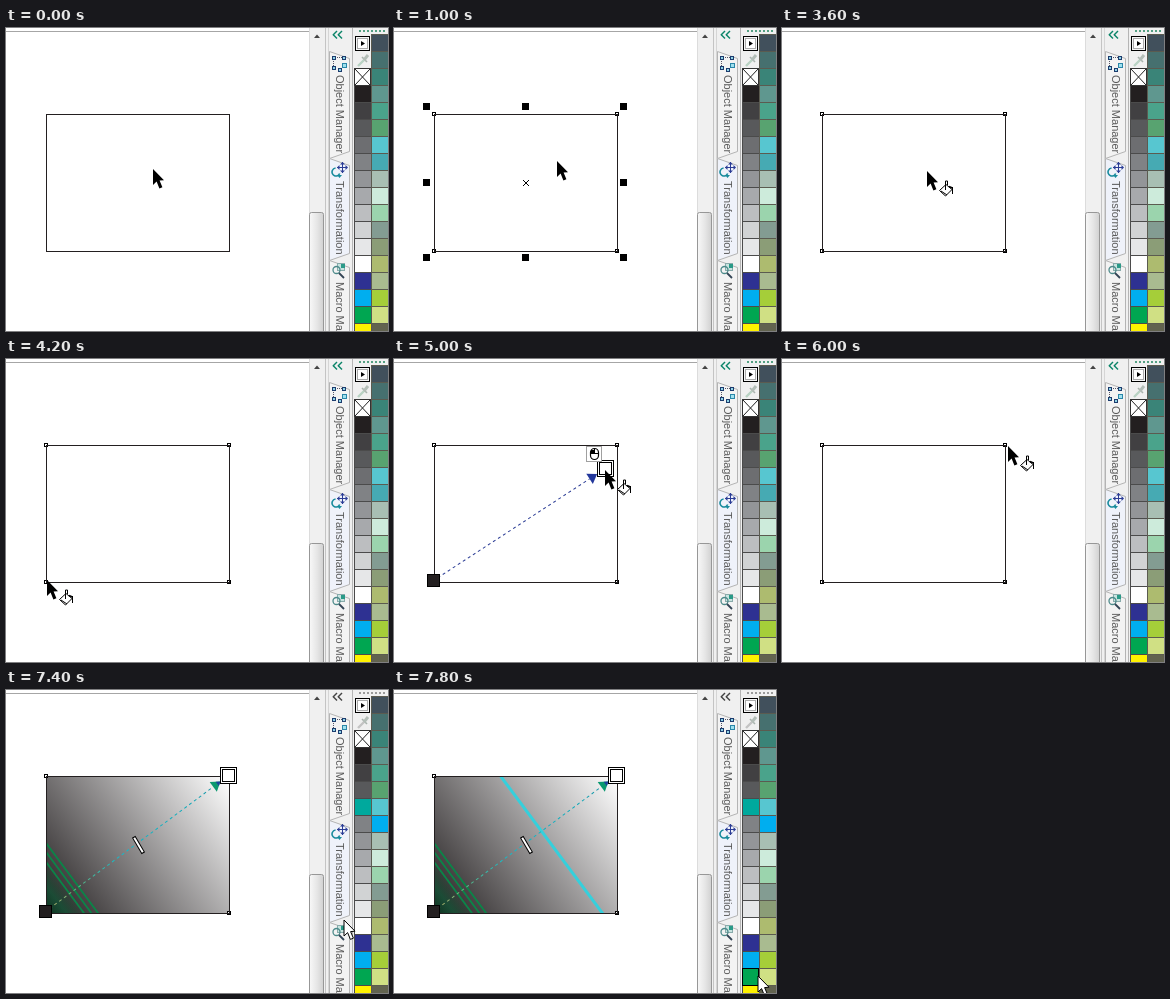
Write an HTML page with a canvas that moves like this. It is 382 px wide and 303 px high and loops after 8 s.

```html
<!DOCTYPE html>
<html lang="en">
<head>
<meta charset="utf-8">
<title>Interactive fill</title>
<style>
html, body { margin: 0; width: 100%; height: 100%; overflow: hidden; background: #fff; }
canvas { display: block; }
</style>
</head>
<body>
<canvas id="stage" width="382" height="303"></canvas>
<script>
const g = document.getElementById('stage').getContext('2d');
const INK = '#231f20';
const START = [39.5, 221.5], END = [222, 85];
const LEFT = ['#231f20', '#414042', '#58595b', '#6d6e71', '#808285', '#939598', '#a7a9ac',
  '#bcbec0', '#d1d3d4', '#e6e7e8', '#fff', '#2e3192', '#00aeef', '#00a651', '#fff200'];
const RIGHT = ['#41505c', '#46706f', '#3a8478', '#5f978f', '#4aa38b', '#58a370', '#57c6d0',
  '#46aab3', '#a8bfb3', '#cdebdb', '#9bd4ad', '#839c92', '#8b9d77', '#adbb6f', '#a9bb90',
  '#a5ce39', '#d0e084', '#62634f'];

// Pointer positions: start time, x, y
const PATH = [
  [0, 147, 141], [200, 163, 133], [3600, 145, 143], [3800, 51, 200], [4000, 47, 217],
  [4200, 41, 221], [4400, 53, 213], [4600, 113, 180], [4800, 178, 142], [5000, 211, 111],
  [5200, 219, 103], [5400, 225, 92], [5600, 226, 88], [5800, 226, 87], [6200, 227, 90],
  [7200, 278, 121], [7400, 338, 230], [7600, 364, 281], [7800, 364, 286]
];

function fill(color, x, y, w, h) {
  g.fillStyle = color;
  g.fillRect(x, y, w, h);
}

function box(x, y, w, h, border, inside) {
  fill(border, x, y, w, h);
  fill(inside, x + 1, y + 1, w - 2, h - 2);
}

function poly(points, color, stroke, width = 1) {
  g.beginPath();
  points.forEach(p => g.lineTo(p[0], p[1]));
  g.closePath();
  if (color) { g.fillStyle = color; g.fill(); }
  if (stroke) { g.strokeStyle = stroke; g.lineWidth = width; g.stroke(); }
}

function line(x1, y1, x2, y2, color, width = 1) {
  g.strokeStyle = color;
  g.lineWidth = width;
  g.beginPath();
  g.moveTo(x1, y1);
  g.lineTo(x2, y2);
  g.stroke();
}

function ring(x, y, r, color, width, from = 0, to = 7) {
  g.strokeStyle = color;
  g.lineWidth = width;
  g.beginPath();
  g.arc(x, y, r, from, to);
  g.stroke();
}

function at(x, y, draw, angle = 0) {
  g.save();
  g.translate(x, y);
  g.rotate(angle);
  draw();
  g.restore();
}

function blend(stops, a = START, b = END) {
  const grad = g.createLinearGradient(...a, ...b);
  stops.forEach(([k, c]) => grad.addColorStop(k, c));
  return grad;
}

function tab(top, bottom, label, textY, color = '#f3f3f3') {
  poly([[323.5, top], [343.5, top + 7], [343.5, bottom - 6], [323.5, bottom + 1]], color, '#b4b4b4');
  at(329.5, textY, () => {
    g.fillStyle = '#5a5a5a';
    g.font = '11px "Liberation Sans", Arial, sans-serif';
    g.fillText(label, 0, 0);
  }, Math.PI / 2);
}

function tabIcons() {
  for (const [x, y] of [[326, 28], [336, 28], [326, 38], [332, 40]]) box(x, y, 4, 4, '#1d3c6e', '#8fd4e6');
  box(336, 35, 5, 5, '#2a86a8', '#9fe0ee');
  for (let i = 0; i < 3; i++) {
    fill('#556', 331 + i * 2, 29, 1, 1);
    fill('#556', 327, 33 + i * 2, 1, 1);
  }

  ring(330, 144, 4, '#178a9c', 1.6, .4, 4.6);
  poly([[331, 147], [336, 147], [333.5, 150]], '#178a9c');
  line(331, 139.5, 341, 139.5, '#2b3c95', 1);
  line(336.5, 134, 336.5, 145, '#2b3c95', 1);
  for (let i = 0; i < 4; i++)
    at(336.5, 139.5, () => poly([[5.5, 0], [3, -2.5], [3, 2.5]], '#2b3c95'), i * Math.PI / 2);

  box(331, 235, 8, 8, '#8aa', '#c8e4e0');
  fill('#2a9a88', 335, 236, 4, 4);
  ring(330.5, 242, 3.5, '#4c8a8a', 1.3);
  line(333, 245, 338, 250, '#345', 1.8);
}

function palette(t) {
  const dull = t >= 6200, late = t >= 7400;
  fill('#f0f0f0', 347, 0, 35, 303);
  line(346.5, 0, 346.5, 303, '#b5b5b5');
  for (let x = 353; x < 379; x += 4) fill(dull ? '#9a9a9a' : '#55a083', x, 2, 2, 2);
  fill('#4b4b4b', 348, 57, 18, 246);
  fill('#5b5b50', 365, 6, 17, 297);
  LEFT.forEach((c, i) => fill(late && i === 3 ? '#00a99d' : c, 349, 58 + i * 17, 16, 16));
  RIGHT.forEach((c, i) => fill(late && i === 7 ? '#00aeef' : c, 366, 7 + i * 17, 16, 16));
  box(349, 8, 15, 15, '#000', '#f6f6f6');
  box(351, 10, 11, 11, '#aaa', '#fff');
  poly([[355, 13], [355, 18], [359, 15.5]], '#000');
  line(352, 38, 358, 32, dull ? '#c4c4c4' : '#b9d3c4', 2.4);
  line(356, 29, 361, 34, '#a9b3ad', 1.6);
  line(358, 32, 362, 27, '#b4beb8', 3);
  box(348, 40, 17, 18, '#333', '#fff');
  line(349, 41, 364, 57, '#222');
  line(364, 41, 349, 57, '#222');
  if (t >= 7800) box(348, 278, 17, 18, '#000', '#00a651');
}

function frame(t) {
  fill('#fff', 0, 0, 382, 303);
  line(0, 3.5, 303, 3.5, '#a6a6a6');
  fill('#f0f0f0', 303, 0, 45, 303);
  line(303.5, 0, 303.5, 303, '#dcdcdc');
  line(319.5, 0, 319.5, 303, '#c4c4c4');
  poly([[308, 10], [311, 6.5], [314, 10]], '#444');
  g.beginPath();
  g.roundRect(303.5, 184.5, 14, 130, 2);
  g.fillStyle = blend([[0, '#f7f7f7'], [.5, '#e6e6e6'], [1, '#cfcfcf']], [304, 0], [318, 0]);
  g.fill();
  g.strokeStyle = '#979797';
  g.lineWidth = 1;
  g.stroke();
  line(322.5, 0, 322.5, 303, '#d5d5d5');
  for (const x of [331, 336]) {
    const c = t < 6200 ? '#0b8468' : '#444';
    line(x, 3, x - 4, 7, c, 1.5);
    line(x - 4, 6.5, x, 10.5, c, 1.5);
  }
  tab(23.5, 129.5, 'Object Manager', 47);
  tab(130.5, 231.5, 'Transformation', 153, '#eff2fa');
  tab(232.5, 340, 'Macro Manager', 254);
  tabIcons();
  palette(t);
}

function gradientFill(t) {
  const late = t >= 7400;
  g.save();
  g.beginPath();
  g.rect(41, 87, 182, 136);
  g.clip();
  fill(blend([[0, INK], [1, '#fff']]), 40, 86, 184, 138);
  fill(blend([[0, 'rgba(0,60,30,.6)'], [.07, 'rgba(5,105,60,.5)'], [.14, 'rgba(0,90,45,0)']]), 40, 86, 184, 138);
  const band = (x, y, color, width) => line(x, y, x + 136, y + 183, color, width);
  if (late) for (const y of [153, 162, 172]) band(40, y, '#0a8548', 1.8);
  else {
    band(40, 153, '#0b8849', 2.2);
    band(40, 162, '#0b8849', 2.2);
    band(40, 168, '#0b8849', 1.4);
    for (const x of [84, 102]) band(x, 86, 'rgba(255,255,255,.09)', 1.2);
  }
  if (t >= 7600) band(106.5, 86, '#35d0dc', 3);
  g.restore();
}

function sheet(t) {
  if (t >= 6200) gradientFill(t);
  if (t >= 400)
    for (const x of [38, 221]) for (const y of [84, 221]) box(x, y, 4, 4, '#000', '#fff');
  g.strokeStyle = INK;
  g.lineWidth = 1;
  g.strokeRect(40.5, 86.5, 183, 137);
  if (t >= 600 && t < 2400) {
    for (const x of [29, 128, 226]) for (const y of [75, 151, 226])
      if (x !== 128 || y !== 151) fill('#000', x, y, 7, 7);
    line(129, 152, 135, 158, '#000');
    line(135, 152, 129, 158, '#000');
  }
}

function fillHandles(t, x, y) {
  const done = t >= 6200;
  const [ex, ey] = t >= 5400 ? END : [x, y - 2];
  const dx = ex + .5 - START[0], dy = ey + .5 - START[1], len = Math.hypot(dx, dy);
  if (len > 25) at(...START, () => {
    g.setLineDash([3, 3]);
    const color = done
      ? blend([[0, '#b9a860'], [.2, '#55b58a'], [.4, '#12bccb'], [.8, '#10a8b8'], [1, '#1c7f94']], [0, 0], [len, 0])
      : '#2b3c95';
    line(5, 0, len - 19, 0, color);
    g.setLineDash([]);
    poly([[len - 10, 0], [len - 19, -6], [len - 19, 6]], done ? '#0b9870' : '#22379b');
    if (done) poly([[len - 10, 0], [len - 14, -2.6], [len - 14, 2.6]], '#1b3f9c');
  }, Math.atan2(dy, dx));
  if (t >= 5600) at(132.5, 155, () => box(-9.5, -2, 19, 4, '#000', '#fff'), 1.04);
  box(33, 215, 13, 13, '#000', INK);
  const bx = ex - 8, by = ey - 8;
  box(bx, by, 17, 17, '#000', '#fff');
  box(bx + 2, by + 2, 13, 13, '#000', '#fff');
}

function mouseBadge(x, y) {
  box(x, y, 16, 16, '#a0a0a0', '#fff');
  g.beginPath();
  g.roundRect(x + 4.5, y + 2.5, 8, 11, 4);
  g.strokeStyle = '#000';
  g.lineWidth = 1.2;
  g.stroke();
  fill('#000', x + 5, y + 4, 4, 4);
  line(x + 5, y + 7.5, x + 12, y + 7.5, '#000');
  line(x + 8.5, y + 3, x + 8.5, y + 8, '#000');
}

function arrow(color, border) {
  poly([[0, 0], [0, 16], [3.6, 12.6], [6.4, 19.4], [9.4, 18.2], [6.6, 11.6], [11, 11.2]], color, border);
}

function bucket() {
  poly([[12.5, 19.5], [19, 13.5], [25, 18.5], [18.5, 25]], '#fff', '#000');
  line(14, 20, 20, 24, '#000');
  line(18.5, 19, 18.5, 10, '#000');
  line(18.5, 10, 20.5, 10, '#000');
  line(20.5, 10, 20.5, 14, '#000');
  line(22, 15.5, 25.5, 17, '#000', 1.4);
  line(25.5, 16, 25.5, 23, '#000');
}

function pointer(t, x, y) {
  at(x, y, () => {
    if (t < 6200) {
      arrow('#000');
      if (t >= 2400) bucket();
    } else if (t < 7200) {
      line(-9, .5, 9, .5, '#000');
      line(.5, -9, .5, 9, '#000');
    } else arrow('#fff', '#000');
  });
}

function draw(t) {
  const [, x, y] = PATH.findLast(p => p[0] <= t);
  const dragging = t >= 4400 && t < 6000;
  frame(t);
  sheet(t);
  if (dragging || t >= 6200) fillHandles(t, x, y);
  if (t >= 400 && t < 1000) mouseBadge(144, 109);
  if (dragging) t < 4600 ? mouseBadge(23, 196) : mouseBadge(x - 19, y - 24);
  pointer(t, x, y);
}

const t0 = performance.now();
function tick() {
  draw((performance.now() - t0) % 8000);
  requestAnimationFrame(tick);
}
tick();
</script>
</body>
</html>
```
